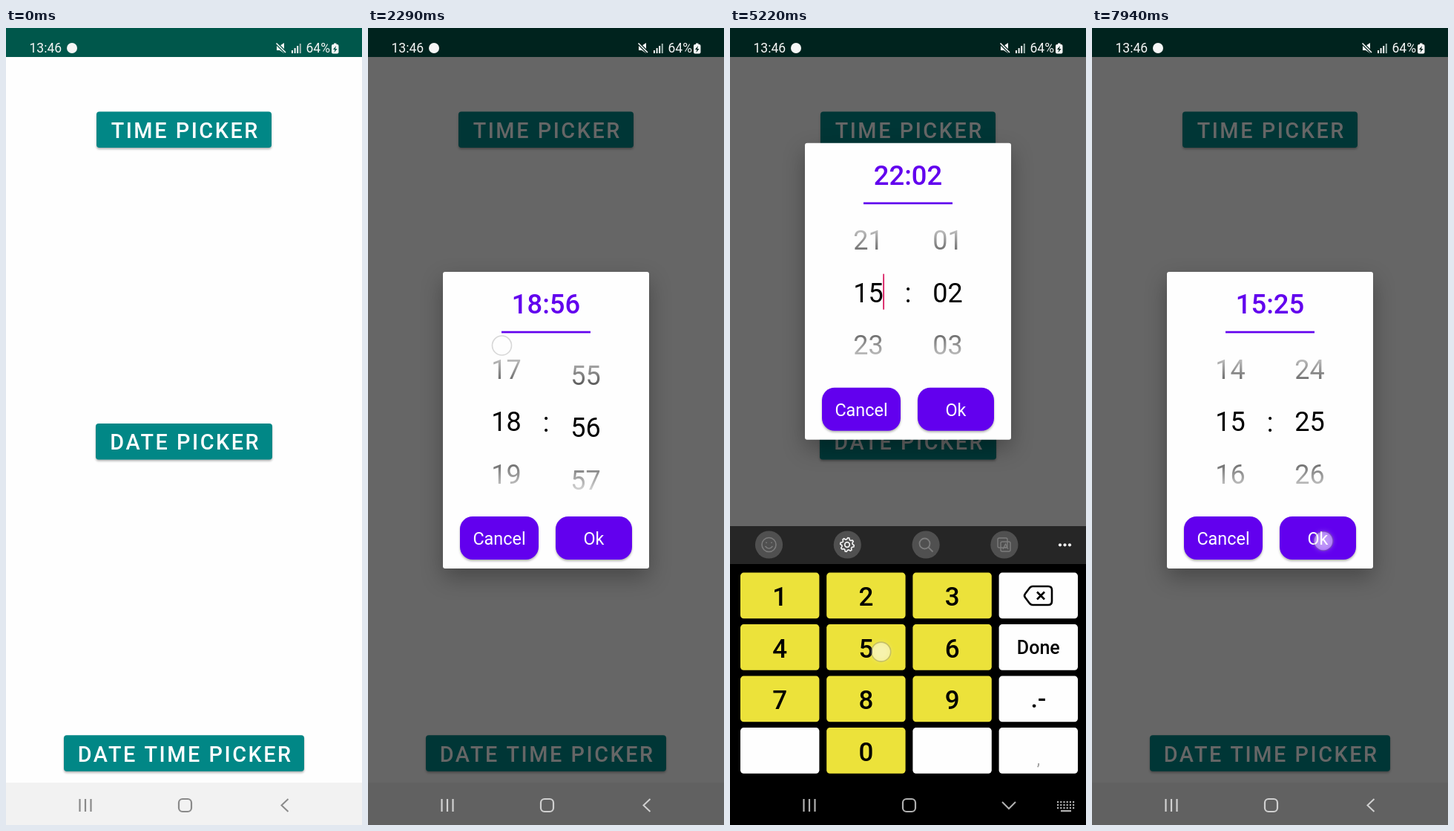
These frames come from a looping animation (480 by 1072 pixels, 8 s). An HTML page with a canvas:

```html
<!DOCTYPE html>
<html lang="en">
<head>
<meta charset="utf-8">
<title>Time picker</title>
<style>
html, body { margin: 0; width: 100%; height: 100%; overflow: hidden; background: #fefefe; }
canvas { display: block; }
</style>
</head>
<body>
<canvas id="stage" width="480" height="1072"></canvas>
<script>
const g = document.getElementById('stage').getContext('2d');
const LOOP = 8000, PURPLE = '#6200ee', PAPER = '#fefefe', ROW = 70.5, MID = 529.5;
const HOUR_X = 186.5, MINUTE_X = 293.5;
const HOUR_SET = 5600, MINUTE_SET = 7350;
const KEYS = '1 2 3 < 4 5 6 Done 7 8 9 .- _ 0 _ ,'.split(' ');

const SWIPES = [
  { x: HOUR_X, at: 1640, steps: 5, hold: 700 },
  { x: MINUTE_X, at: 1750, steps: 10, hold: 400 },
  { x: HOUR_X, at: 2560, steps: 4, hold: 600 },
  { x: MINUTE_X, at: 2770, steps: 6, hold: 400 }
];
const TAPS = [[380, 'open'], [3190, 'hour'], [3920, 'hour'], [4900, '1'], [5150, '5'],
  [5550, 'minute'], [6350, '2'], [6600, '5'], [7200, 'Done'], [7880, 'ok']];
const SPOTS = { open: [240, 140], hour: [185, 530], minute: [302, 357], ok: [312, 690] };

const clamp = x => Math.max(0, Math.min(1, x));
const ramp = (t, a, b) => 1 - (1 - clamp((t - a) / (b - a))) ** 3;
const fling = (t, at) => ramp(t, at, at + 700);
const pad = n => String(n).padStart(2, '0');
const mix = (a, b, k) => `rgb(${a.map((v, i) => Math.round(v + (b[i] - v) * k))})`;
const gray = (a, b, k) => mix([a, a, a], [b, b, b], k);

// Digits typed on the keyboard between two times
function typed(from, to) {
  return TAPS.filter(([at, s]) => at > from && at + 40 < to && s >= '0' && s <= '9')
    .map(tap => tap[1]).join('');
}

function scrolled(t, x, first) {
  return SWIPES.filter(s => s.x === x).reduce((v, s) => v + s.steps * fling(t, s.at), first);
}

function keyCorner(i) {
  return [14 + (i % 4) * 116.2, 732.6 + Math.floor(i / 4) * 69.5];
}

function fillRect(x, y, w, h, color) {
  g.fillStyle = color;
  g.fillRect(x, y, w, h);
}

function box(x, y, w, h, r, color) {
  g.fillStyle = color;
  g.beginPath();
  g.roundRect(x, y, w, h, r);
  g.fill();
}

function disc(x, y, r, color) {
  g.fillStyle = color;
  g.beginPath();
  g.arc(x, y, r, 0, 7);
  g.fill();
}

function ring(x, y, r, color, width) {
  g.strokeStyle = color;
  g.lineWidth = width;
  g.beginPath();
  g.arc(x, y, r, 0, 7);
  g.stroke();
}

function line(path, color, width = 2) {
  g.strokeStyle = color;
  g.lineWidth = width;
  g.stroke(new Path2D(path));
}

function text(s, x, y, size, color, weight = 400, align = 'center') {
  g.font = `${weight} ${size}px Roboto, sans-serif`;
  g.textAlign = align;
  g.fillStyle = color;
  g.fillText(s, x, y);
}

function shadow(y, blur, color) {
  g.shadowOffsetY = y;
  g.shadowBlur = blur;
  g.shadowColor = color;
}
const noShadow = () => shadow(0, 0, 'transparent');

function statusBar(dim) {
  const ink = '#f6f6f6', back = mix([0, 87, 75], [0, 35, 30], dim);
  fillRect(0, 0, 480, 39, back);
  text('13:46', 31.5, 33, 17.5, ink, 400, 'left');
  disc(89, 27, 7, ink);
  g.fillStyle = ink;
  g.fill(new Path2D('M365 24h4l6-4v14l-6-4h-4z'));
  line('M364 20L378 34', back, 4);
  line('M364.5 20.5L377 33', ink, 1.6);
  for (let i = 0; i < 4; i++) fillRect(385 + i * 3.6, 30 - i * 3, 2, 4 + i * 3, i < 3 ? ink : '#a0b5b0');
  text('64%', 404.5, 33, 17.5, ink, 400, 'left');
  box(439, 22, 9.5, 12.5, 2, ink);
  fillRect(442, 20.5, 3.5, 2, ink);
  g.fillStyle = back;
  g.fill(new Path2D('M445 24l-4 5h2.4l-1 4 4.2-5H444z'));
}

function mainScreen(dim) {
  fillRect(0, 0, 480, 1072, gray(254, 102, dim));
  g.letterSpacing = '2.55px';
  ['TIME PICKER', 'DATE PICKER', 'DATE TIME PICKER'].forEach((s, i) => {
    const y = 112.5 + i * 419.4, w = [236, 238, 324][i];
    shadow(2, 3, 'rgba(0,0,0,.3)');
    box(240 - w / 2, y, w, 48.5, 4, mix([1, 135, 134], [0, 54, 54], dim));
    noShadow();
    text(s, 241.7, y + 35.5, 28.8, gray(254, 102, dim), 500);
  });
  g.letterSpacing = '0px';
}

function wheel(x, value, size, edit) {
  const near = Math.round(value);
  for (let i = near - 2; i <= near + 2; i++) {
    const own = edit && i === near;
    text(own ? edit : pad((i + size) % size), x, MID + 12.7 + (i - value) * ROW, 36, '#000');
    if (own) fillRect(x + g.measureText(edit).width / 2 - 0.5, 504, 1.8, 48, '#d81b60');
  }
}

function fade(y, from, to) {
  const grad = g.createLinearGradient(0, from, 0, to);
  grad.addColorStop(0, 'rgb(254,254,254)');
  grad.addColorStop(1, 'rgba(254,254,254,0)');
  fillRect(130, y, 220, 88, grad);
}

function dialog(t, lift) {
  const open = ramp(t, 1080, 1330), scale = 0.85 + 0.15 * open;
  if (!open) return;
  const hourDone = t >= HOUR_SET, minuteDone = t >= MINUTE_SET;
  const hourText = typed(0, Math.min(t, HOUR_SET));
  const minuteText = typed(HOUR_SET, Math.min(t, MINUTE_SET));
  const h = hourDone ? +hourText : scrolled(t, HOUR_X, 13);
  const m = minuteDone ? +minuteText : scrolled(t, MINUTE_X, 46);

  g.save();
  g.globalAlpha = open;
  g.translate(240, 527.5 - lift * 173.3);
  g.scale(scale, scale);
  g.translate(-240, -527.5);
  shadow(12, 30, 'rgba(0,0,0,.3)');
  box(101, 328, 278, 399, 3, PAPER);
  noShadow();

  g.save();
  g.beginPath();
  g.rect(130, 423, 220, 213);
  g.clip();
  wheel(HOUR_X, h, 24, !hourDone && hourText);
  wheel(MINUTE_X, m, 60, !minuteDone && minuteText);
  fade(423, 423, 511);
  fade(548, 636, 548);
  g.restore();
  text(':', 240, MID + 13, 36, '#000');

  text(pad(Math.round(h) % 24) + ':' + pad(Math.round(m) % 60), 240, 384.3, 36.4, PURPLE, 500);
  fillRect(180, 407.7, 120, 2.7, PURPLE);
  for (const [s, x, w] of [['Cancel', 124, 106], ['Ok', 253, 103]]) {
    shadow(2, 3, 'rgba(0,0,0,.3)');
    box(x, 657, w, 58, 17, PURPLE);
    noShadow();
    text(s, x + w / 2, 694.8, 23.4, '#fff');
  }
  g.restore();
}

function toolbar() {
  const pale = '#f0f0f0', faint = '#7c7c7c';
  fillRect(0, 670, 480, 51, '#262626');
  for (let i = 0; i < 4; i++) disc(52.5 + i * 105.8, 695, 18.6, '#505050');
  ring(52.5, 695, 9.5, faint, 1.6);
  line('M47.5 697q5 6 10 0M49 691.5v1.5M56 691.5v1.5', faint, 1.6);
  // Gear: a radius that steps in and out eight times
  g.beginPath();
  for (let i = 0; i < 32; i++) {
    const a = (i + 0.5) * Math.PI / 16, r = i % 4 < 2 ? 9.3 : 7.2;
    g.lineTo(158 + r * Math.cos(a), 695 + r * Math.sin(a));
  }
  g.closePath();
  g.strokeStyle = pale;
  g.lineWidth = 1.7;
  g.stroke();
  ring(158, 695, 3.3, pale, 1.7);
  ring(262.5, 693.5, 7, faint, 1.8);
  line('M267.5 698.5l6 6', faint, 1.8);
  g.strokeStyle = faint;
  g.lineWidth = 1.4;
  for (const [x, y] of [[361, 686], [365, 691]]) {
    g.beginPath();
    g.roundRect(x, y, 13, 13, 2);
    g.stroke();
  }
  line('M368 701l3.5-7 3.5 7M369.5 698.5h4', faint, 1.4);
  for (let i = 0; i < 3; i++) disc(445 + i * 6.5, 695.3, 2.1, pale);
}

function keyboard(k) {
  if (!k) return;
  g.save();
  g.translate(0, (1 - k) * 402);
  toolbar();
  fillRect(0, 721, 480, 351, '#000');
  KEYS.forEach((s, i) => {
    const [x, y] = keyCorner(i), cx = x + 53.2, digit = /\d/.test(s);
    box(x, y, 106.4, 61.6, 4.5, digit ? '#ece23a' : PAPER);
    if (digit) text(s, cx, y + 44.4, 35, '#000', 500);
    else if (s === 'Done') text(s, cx, y + 40, 25, '#000', 500);
    else if (s === '.-') text(s, cx, y + 42, 34, '#000', 500);
    else if (s === ',') text(s, cx, y + 50, 22, '#a0a0a0');
    else if (s === '<') line('M408 751h21q5 0 5 5v15q0 5-5 5h-21q-2 0-4-2l-6-8q-2-2.5 0-5l6-8q2-2 4-2zM414 758.5l10 10M424 758.5l-10 10', '#000', 2.6);
  });
  g.restore();
}

function navBar(dim, typing) {
  const color = typing ? '#b0b0b0' : gray(138, 208, dim);
  fillRect(0, 1015, 480, 57, typing ? '#000' : gray(242, 97, dim));
  line('M99.5 1037v17M107 1037v17M114.5 1037v17', color, 2.2);
  g.beginPath();
  g.roundRect(233, 1037, 17, 17, 5);
  g.stroke();
  if (!typing) return line('M380.5 1037l-9 8.5 9 8.5', color);
  line('M367 1041l9 9 9-9', color);
  for (let i = 0; i < 18; i++) fillRect(441 + i % 6 * 4.2, 1040 + Math.floor(i / 6) * 4, 2.2, 2.2, color);
  fillRect(446, 1052, 14, 2.2, color);
}

function finger(t, at, hold, x, y) {
  if (t < at || t > at + hold) return;
  g.globalAlpha = Math.min(1, (t - at) / 40, (at + hold - t) / 60);
  shadow(0, 7, 'rgba(255,255,255,.7)');
  disc(x, y, 12.5, 'rgba(255,255,255,.42)');
  noShadow();
  ring(x, y, 13, 'rgba(120,120,120,.35)', 1.6);
  g.globalAlpha = 1;
}

function touches(t) {
  for (const { x, at, hold } of SWIPES) {
    const side = x < 240 ? -6 : 30;
    finger(t, at, hold, x + side, 610 - 183 * fling(t, at));
  }
  for (const [at, name] of TAPS) {
    // On keys the finger lands a little right of and below the label
    const [x, y] = SPOTS[name] || keyCorner(KEYS.indexOf(name)).map((v, i) => v + [73.5, 37][i]);
    finger(t, at, 210, x, y);
  }
}

const start = performance.now();

function draw() {
  const t = (performance.now() - start) % LOOP;
  const dim = 0.85 * ramp(t, 990, 1330) + 0.15 * ramp(t, 1600, 1680);
  const k = ramp(t, 4130, 4370) - ramp(t, 7480, 7740);
  mainScreen(dim);
  statusBar(dim);
  dialog(t, k);
  keyboard(k);
  navBar(dim, k > 0.5);
  touches(t);
  requestAnimationFrame(draw);
}
draw();
</script>
</body>
</html>
```
